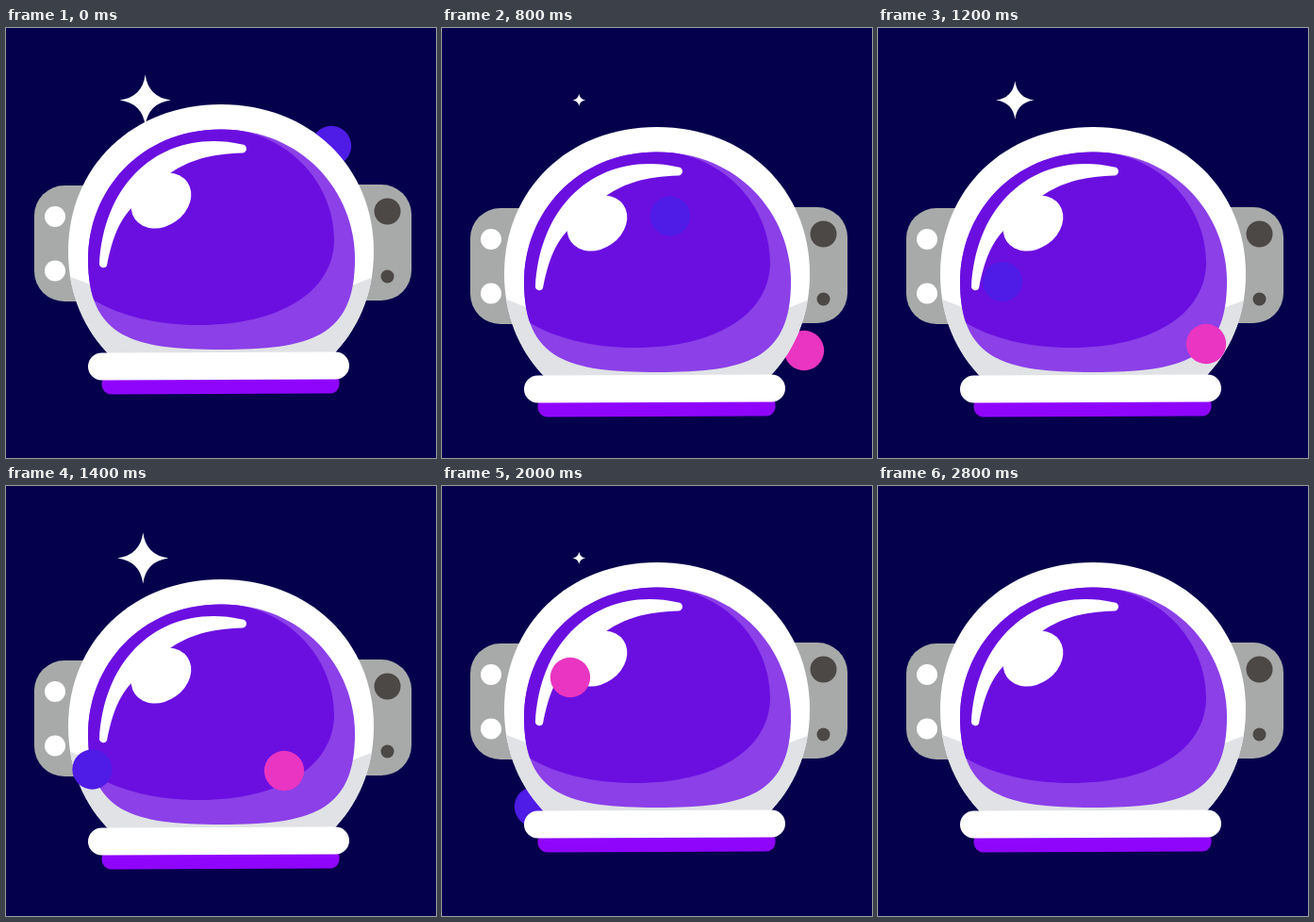
These frames come from a looping animation (456 px wide and 456 px high, 3000 ms). An HTML page:

```html
<!DOCTYPE html>
<html lang="en">
<head>
<meta charset="utf-8">
<title>Space helmet</title>
<style>
  html, body { margin: 0; width: 100%; height: 100%; overflow: hidden; background: #05004c; }
  svg { display: block; width: 100%; height: 100%; }
</style>
</head>
<body>
<svg viewBox="0 0 456 456">
  <defs>
    <clipPath id="shell">
      <path d="M228 81C322 81 390 147 390 237C390 327 322 393 228 393C134 393 66 327 66 237C66 147 134 81 228 81Z"/>
    </clipPath>
    <clipPath id="visor">
      <path id="glass" d="M228 107.500C314 107.500 370 173 370 245C370 328 322 341 228 341C134 341 87 328 87 245C87 173 142 107.500 228 107.500Z"/>
    </clipPath>
  </defs>

  <path id="star" fill="#fff" d="M0-1Q.12-.12 1 0Q.12 .12 0 1Q-.12 .12-1 0Q-.12-.12 0-1Z"/>
  <g id="back"></g>

  <g id="helmet">
    <rect x="30" y="167" width="100" height="123" rx="32" fill="#a8aaa9"/>
    <rect x="330" y="166" width="100" height="123" rx="32" fill="#a8aaa9"/>
    <g fill="#fff">
      <circle cx="52" cy="200" r="11"/>
      <circle cx="52" cy="257.500" r="11"/>
    </g>
    <g fill="#4c4846">
      <circle cx="404.500" cy="194.500" r="14"/>
      <circle cx="404.500" cy="263.500" r="7"/>
    </g>

    <g clip-path="url(#shell)">
      <path fill="#fff" d="M60 75H400V350H60Z"/>
      <path fill="#e0e2e6" d="M66 263Q228 330 390 264V350H66Z"/>
    </g>
    <use href="#glass" fill="#8b40e8"/>
    <path clip-path="url(#visor)" fill="#6b0fe0"
      d="M250 109C312 122 348 174 348 224C348 280 290 315 205 315C160 315 120 305 92 288L80 250V100H228Z"/>

    <g fill="#fff">
      <path d="M250.500 123.500C172 106 104 156 99 251A4.300 4.300 0 0 0 107 252C113 220 122 202 134 190L174 154C195 140 215 134 250.500 132.500A4.500 4.500 0 0 0 250.500 123.500Z"/>
      <ellipse rx="34" ry="27" transform="translate(164.500 183) rotate(-35)"/>
    </g>

    <g transform="rotate(-.2 226 360)">
      <rect x="101.500" y="366" width="252" height="22" rx="10" fill="#8f05fb"/>
      <rect x="87" y="344" width="277" height="29" rx="14.500" fill="#fff"/>
    </g>
  </g>

  <g id="front"></g>
</svg>

<script>
  const STEP = 200, STEPS = 15;
  const byId = id => document.getElementById(id);

  // Each ball crosses in front of the helmet, turns, and returns behind it.
  // Both pass their waypoints at the same phases; only the start differs.
  const PHASES = [0, 4, 6, 8, 13, STEPS];
  const FRONT_END = 6;
  const balls = [
    { color: '#4f1be6', start: 2,
      way: [[352, 130], [132, 269], [51, 332], [98, 340], [345, 125]] },
    { color: '#e935c1', start: 6,
      way: [[348, 335], [136, 203], [58, 155], [112, 185], [384, 342]] }
  ];

  for (const ball of balls) {
    ball.node = document.createElementNS('http://www.w3.org/2000/svg', 'circle');
    ball.node.setAttribute('r', 21.2);
    ball.node.setAttribute('fill', ball.color);
  }

  function drawBall({ node, start, way }, step) {
    const phase = (step - start + STEPS) % STEPS;
    const next = PHASES.findIndex(p => p > phase);
    const from = way[next - 1], to = way[next % way.length];
    const k = (phase - PHASES[next - 1]) / (PHASES[next] - PHASES[next - 1]);
    node.setAttribute('cx', from[0] + (to[0] - from[0]) * k);
    node.setAttribute('cy', from[1] + (to[1] - from[1]) * k);
    byId(phase <= FRONT_END ? 'front' : 'back').append(node);
  }

  // Triangular rise and fall around a peak.
  const pulse = (step, peak, fade) => Math.max(0, 1 - Math.abs(step - peak) / fade);

  // Down five steps, up six, then a short settling dip.
  const bob = step => 6 * Math.max(5 - Math.abs(step - 5), 1 - Math.abs(step - 13));

  function draw(step) {
    const size = 27 * Math.max(pulse(step, 0, 3.25), pulse(step, 7, 4));
    byId('star').setAttribute('transform', `translate(${145.3 + 2.4 * pulse(step, 0, 1)} 76.500) scale(${size})`);
    byId('helmet').setAttribute('transform', `translate(0 ${bob(step)})`);
    for (const ball of balls) drawBall(ball, step);
  }

  let shown = -1;
  function tick() {
    const step = Math.floor(performance.now() / STEP) % STEPS;
    if (step !== shown) draw(shown = step);
    requestAnimationFrame(tick);
  }
  tick();
</script>
</body>
</html>
```
